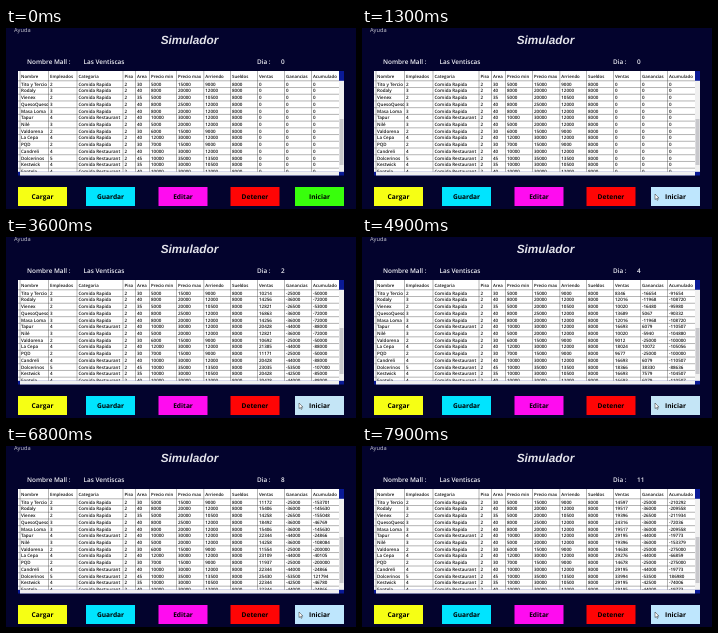
Write an HTML page that moves like this. It is 350 px wide and 181 px high and loops after 8 s.

```html
<!DOCTYPE html>
<html lang="es">
<head>
<meta charset="utf-8">
<title>Simulador</title>
<style>
  html, body { margin: 0; width: 100%; height: 100%; overflow: hidden; background: #03032d; }
  svg { display: block; width: 100%; height: 100%; }
  text { font-family: "Open Sans", "Noto Sans", sans-serif; font-weight: 600; text-rendering: geometricPrecision; white-space: pre; }
  .cell { font-size: 4.5px; fill: #111; }
  .head { font-size: 4.35px; fill: #111; }
  .label { font-size: 6.4px; fill: #f0f0f6; }
  .button { font-size: 6.6px; font-weight: 700; text-anchor: middle; }
  .menu { font-size: 5.7px; font-weight: 400; fill: #c8c8d0; }
  .title { font: italic 700 11.8px "Liberation Sans", Arial, sans-serif; fill: #e2e2ea; text-anchor: middle; }
</style>
</head>
<body>
<svg id="stage" viewBox="0 0 350 181">
  <clipPath id="body"><rect x="12" y="43" width="321" height="100.8"/></clipPath>
  <clipPath id="names"><rect x="12" y="43" width="30.3" height="100.8"/></clipPath>
</svg>
<script>
const LOOP = 8000;
const stage = document.getElementById('stage');

function add(tag, attrs, content = '', parent = stage) {
  const el = document.createElementNS('http://www.w3.org/2000/svg', tag);
  for (const key in attrs) el.setAttribute(key, attrs[key]);
  el.textContent = content;
  parent.append(el);
  return el;
}
const rect = (x, y, width, height, fill) => add('rect', { x, y, width, height, fill });
const text = (x, y, content, cls, parent) => add('text', { x, y, class: cls }, content, parent);

// Customers per day, one hex digit for each day
const NONE = '00000000000', FEW = '00011210110', SOME = '00122420120',
      MANY = '00133630230', MORE = '00133740340', MOST = '00255a50460';
// Position of the day's sale price between a shop's minimum and maximum
const PRICE = [.11079, .5214, .2707, .334675, .703935, .39587, .29986, .6172, .009175, .831825, .95979];
const WAGE = 8000;

// name, staff, kind, area, min price, max price, customers
const SHOPS = [
  ['Tito y Tercio', 2, 'Rapida', 30, 5000, 15000, FEW],
  ['Rodaly', 3, 'Rapida', 40, 8000, 20000, SOME],
  ['Vienex', 2, 'Rapida', 35, 5000, 20000, FEW],
  ['QuesoQueso', 3, 'Rapida', 40, 8000, 25000, MANY],
  ['Masa Loma', 3, 'Rapida', 40, 8000, 20000, SOME],
  ['Tapur', 4, 'Restaurant', 40, 10000, 30000, MORE],
  ['Nilé', 3, 'Rapida', 40, 5000, 20000, MANY],
  ['Valdorena', 2, 'Rapida', 30, 6000, 15000, NONE],
  ['La Cepa', 4, 'Rapida', 40, 12000, 30000, MANY],
  ['PQD', 2, 'Rapida', 30, 7000, 15000, NONE],
  ['Candreli', 4, 'Restaurant', 40, 10000, 30000, MORE],
  ['Dolcerinos', 5, 'Restaurant', 45, 10000, 35000, MOST],
  ['Kestwick', 4, 'Restaurant', 35, 10000, 30000, MANY],
  ['Fontela', 4, 'Restaurant', 40, 10000, 30000, MORE],
];

// Sales, profit and running total of a shop on a given day
function results([, staff, , area, min, max, customers], day) {
  let sale = 0, profit = 0, total = 0;
  for (let d = 0; d < day; d++) {
    sale = Math.floor(min + PRICE[d] * (max - min));
    profit = parseInt(customers[d], 16) * sale - area * 300 - staff * WAGE;
    total += profit;
  }
  return [sale, profit, total];
}

// Headings
text(8, 4.3, 'Ayuda', 'menu');
text(183.5, 16, 'Simulador', 'title');
text(21, 36.2, 'Nombre Mall :', 'label');
text(77.5, 36.2, 'Las Ventiscas', 'label');
text(251, 36.2, 'Dia :', 'label');
const dayText = text(275, 36.2, '0', 'label');

// Table with its scroll bars
const COLUMNS = [['Nombre', 15], ['Empleados', 44], ['Categoria', 72.5], ['Piso', 118.5], ['Area', 131],
  ['Precio min', 145], ['Precio max', 172], ['Arriendo', 199.3], ['Sueldos', 226], ['Ventas', 253],
  ['Ganancias', 280], ['Acumulado', 307]];
const ROW = 6.72, TOP = 52.8, BOTTOM = 143.8;
rect(12, 43, 326, 104.5, '#0a1a96');
rect(12, 43, 321, BOTTOM - 43, '#fff');
rect(333, TOP, 5, BOTTOM - TOP, '#f0f0f0');
rect(333.5, 91, 4, 46, '#c8c8cc');
rect(14, BOTTOM, 319, 147.5 - BOTTOM, '#f0f0f0');
let lines = 'M14 43V' + BOTTOM;
for (const [, x] of COLUMNS.slice(1)) lines += `M${x - 1.5} 43V${BOTTOM}`;
for (let i = 0; i < SHOPS.length; i++) lines += `M12 ${TOP + ROW * i}H333`;
add('path', { d: lines, stroke: '#333', 'stroke-width': .37, fill: 'none' });

const body = add('g', { 'clip-path': 'url(#body)' });
const names = add('g', { 'clip-path': 'url(#names)' });
for (const [title, x] of COLUMNS) text(x, 50.4, title, 'head', body);
const live = SHOPS.map((shop, i) => {
  const [name, staff, kind, area, min, max] = shop;
  const cells = [name, staff, 'Comida ' + kind, 2, area, min, max, area * 300, WAGE, 0, 0, 0];
  return cells.map((value, c) =>
    text(COLUMNS[c][1], TOP + ROW * i + 4.9, value, 'cell', c ? body : names)).slice(9);
});

// Buttons
const [, , , , start] = [['Cargar', 12, '#f6ff14'], ['Guardar', 80, '#00e4ff'], ['Editar', 152.5, '#ff0cf0'],
  ['Detener', 224.5, '#ff0505'], ['Iniciar', 289, '#38ff0c']].map(([name, x, fill]) => {
  const box = rect(x, 159, 49, 19, fill);
  text(x + 24.5, 171, name, 'button');
  return box;
});

const cursor = add('path', { d: 'M0 0V5.6L1.3 4.4L2.2 6.4L3.1 6L2.2 4.1H4Z',
  fill: '#fff', stroke: '#000', 'stroke-width': .4 });

// Timeline: mouse steps every 100 ms from 500, then presses and releases
const PATH = [[175, 179], [215, 175], [250, 171], [277.5, 169], [286, 168], [290, 167], [292, 166.5], [293, 166], [293, 166]];
const PRESS = [1800, 2700, 3600, 4200, 4900, 5500, 6000, 6400, 6900, 7300, 7700];
const RELEASE = [2200, 3100, 3900, 4600, 5200, 5800, 6300, 6800, 7200, 7600, 7900];
const passed = (times, t) => times.filter(at => at <= t).length;

let shownDay = 0;
function showDay(day) {
  if (day === shownDay) return;
  shownDay = day;
  dayText.textContent = day;
  SHOPS.forEach((shop, i) =>
    results(shop, day).forEach((value, c) => live[i][c].textContent = value));
}

function draw(t) {
  const step = Math.min(Math.floor((t - 500) / 100), PATH.length - 1);
  const [x, y] = PATH[Math.max(step, 0)];
  cursor.setAttribute('transform', `translate(${x} ${y})`);
  cursor.setAttribute('visibility', step < 0 ? 'hidden' : 'visible');

  const day = passed(RELEASE, t);
  const pressed = passed(PRESS, t) > day;
  const hover = step >= 0 && x >= 289;
  start.setAttribute('fill', pressed ? '#c4e5f6' : hover ? '#bee6fd' : '#38ff0c');
  showDay(day);
}

const begin = performance.now();
function frame() {
  draw((performance.now() - begin) % LOOP);
  requestAnimationFrame(frame);
}
frame();
</script>
</body>
</html>
```
